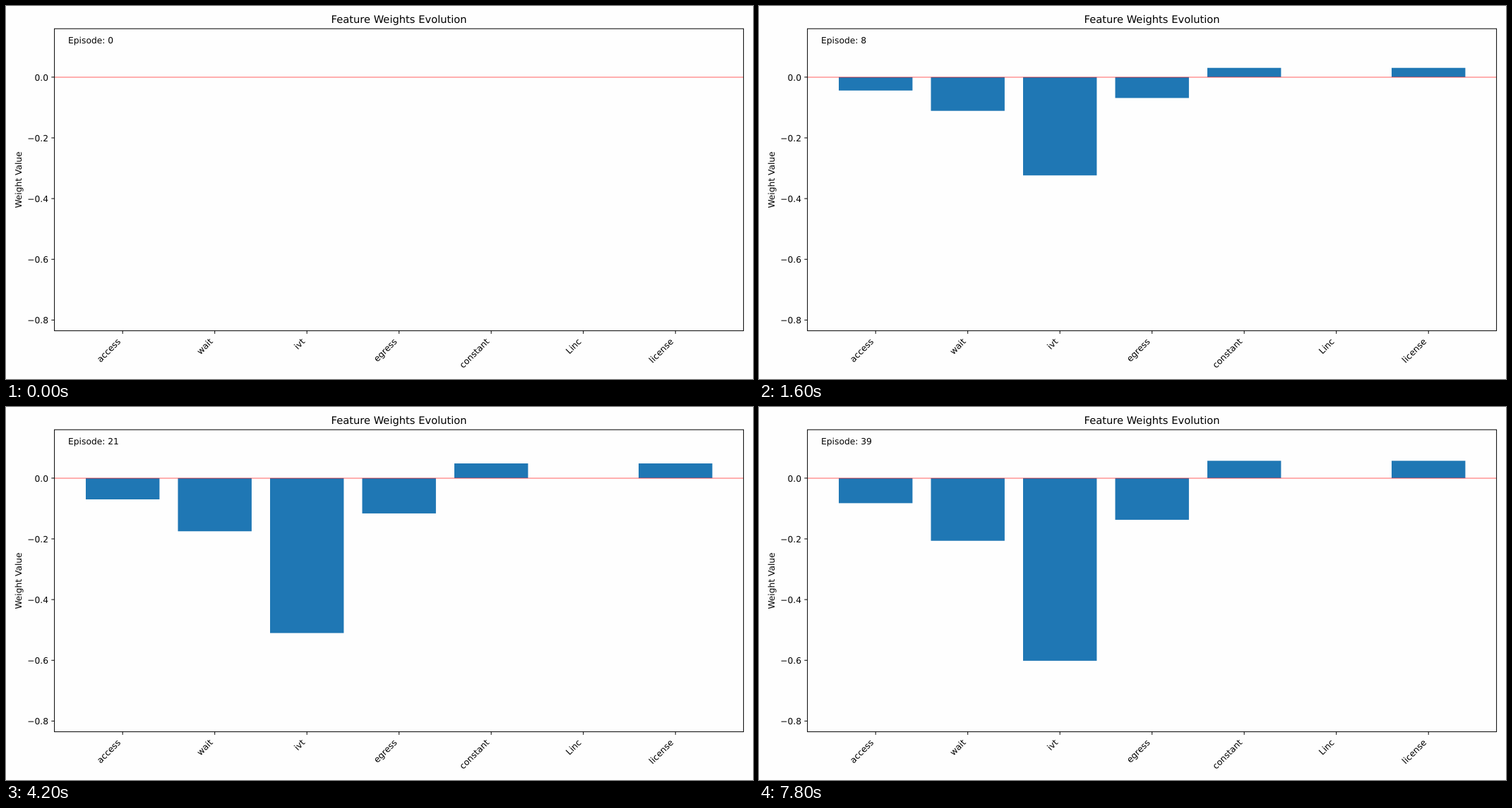
An HTML page for the animation above (8000 ms loop, 1058 by 529 pixels).

```html
<!DOCTYPE html>
<html lang="en">
<head>
<meta charset="utf-8">
<title>Feature Weights Evolution</title>
<style>
html, body { margin: 0; width: 100%; height: 100%; overflow: hidden; background: #fefefe; }
svg { display: block; width: 100vw; height: 100vh; }
text { font-family: "DejaVu Sans", sans-serif; font-size: 12.25px; fill: #000; text-rendering: geometricPrecision; }
.title { font-size: 14.7px; }
.axis { fill: none; stroke: #000; stroke-width: 1; }
.bar { fill: #1f77b4; }
</style>
</head>
<body>
<svg id="chart" viewBox="0 0 1058 529"></svg>
<script>
const svg = document.getElementById('chart');
const LEFT = 68.6, RIGHT = 1044.6, TOP = 32.2, BOTTOM = 460.6;
const ZERO = 100.9, UNIT = 430.6, FIRST = 165.2, GAP = 130.5, BAR = 104.4, TICK = 4.3;
const STEP = 200, EPISODES = 40;

// share: size relative to the largest bar; lag: episodes needed to reach that share
const features = [
  { name: 'access', share: 0.137, lag: 1.6 },
  { name: 'wait', share: 0.343, lag: 0.1 },
  { name: 'ivt', share: 1, lag: 0.1 },
  { name: 'egress', share: 0.228, lag: 3 },
  { name: 'constant', share: -0.095, lag: 1.6 },
  { name: 'Linc', share: 0, lag: 1 },
  { name: 'license', share: -0.095, lag: 1.6 }
];

function add(tag, attrs, text) {
  const el = document.createElementNS('http://www.w3.org/2000/svg', tag);
  for (const key in attrs) el.setAttribute(key, attrs[key]);
  if (text) el.textContent = text;
  return svg.appendChild(el);
}

const centre = i => FIRST + i * GAP;
const bars = features.map((_, i) =>
  add('rect', { class: 'bar', x: centre(i) - BAR / 2, width: BAR }));

add('path', { d: `M${LEFT} ${ZERO}H${RIGHT}`, stroke: '#f00', 'stroke-width': 1.5, 'stroke-opacity': 0.42 });
add('rect', { class: 'axis', x: LEFT, y: TOP, width: RIGHT - LEFT, height: BOTTOM - TOP });

for (let i = 0; i < 5; i++) {
  const value = i * 0.2, y = ZERO + value * UNIT;
  add('path', { class: 'axis', d: `M${LEFT} ${y}h${-TICK}` });
  add('text', { x: 60, y: y + 4.8, 'text-anchor': 'end' }, (i ? '\u2212' : '') + value.toFixed(1));
}
features.forEach(({ name }, i) => {
  add('path', { class: 'axis', d: `M${centre(i)} ${BOTTOM}v${TICK}` });
  add('text', { transform: `translate(${centre(i) - 2.1} 476.7) rotate(-45)`, 'text-anchor': 'end' }, name);
});
add('text', { class: 'title', x: 556.6, y: 24.3, 'text-anchor': 'middle' }, 'Feature Weights Evolution');
add('text', { transform: 'translate(22.3 246.5) rotate(-90)', 'text-anchor': 'middle' }, 'Weight Value');
const counter = add('text', { x: 88.1, y: 53.4 });

// Saturating growth from 0 towards 1
const rise = (t, tau) => 1 - Math.exp(-t / tau);

function draw(ms) {
  const episode = Math.floor(ms / STEP) % EPISODES;
  // A quick first jump followed by slow learning
  const depth = 39.5 * rise(episode, 0.9) + 235.5 * rise(episode, 14.5);
  counter.textContent = 'Episode: ' + episode;
  features.forEach(({ share, lag }, i) => {
    const h = depth * share * rise(episode, lag);
    bars[i].setAttribute('y', ZERO + Math.min(h, 0));
    bars[i].setAttribute('height', Math.abs(h));
  });
}

const start = performance.now();
function tick() {
  draw(performance.now() - start);
  requestAnimationFrame(tick);
}
draw(0);
requestAnimationFrame(tick);
</script>
</body>
</html>
```
